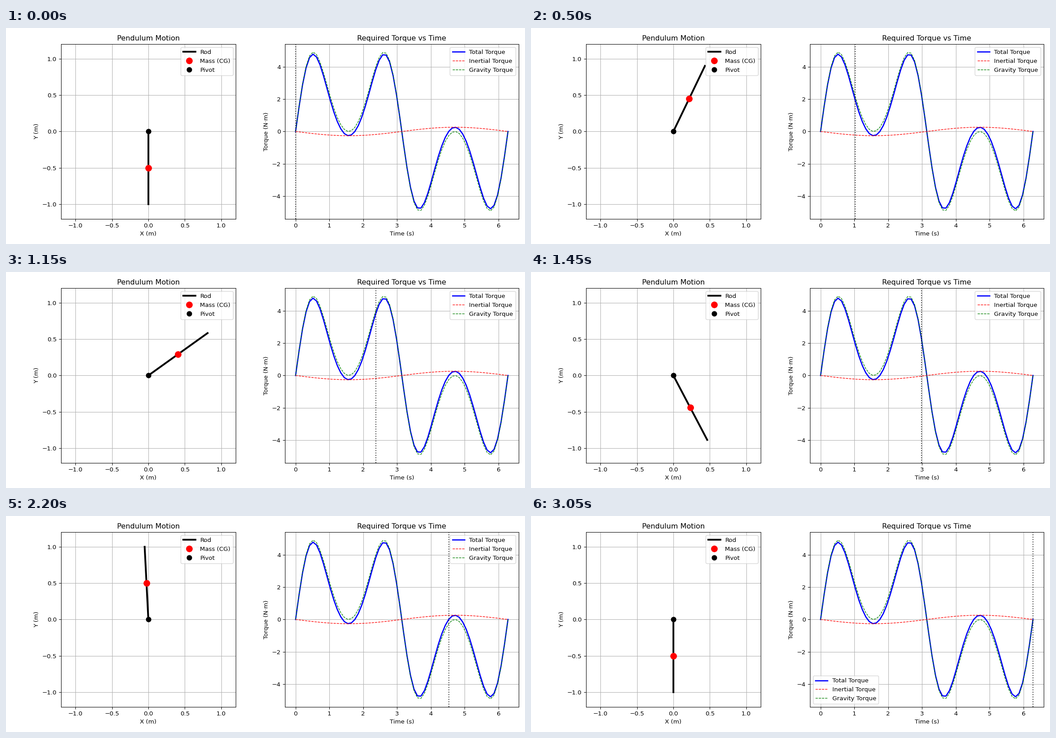
These frames come from a looping animation (1159 by 483 pixels, 3.1 s). A matplotlib script:

```python
import numpy as np
import matplotlib.pyplot as plt
from matplotlib.animation import FuncAnimation

FRAMES, INTERVAL = 62, 50
STAGE_DPI, LAYOUT_DPI = 96.6, 100
MASS, LENGTH, GRAVITY = 1.0, 1.0, 9.81
CENTRE = LENGTH / 2
INERTIA = MASS * LENGTH**2 / 12

plt.rcParams["font.family"] = "DejaVu Sans"

time = np.linspace(0, 2 * np.pi, FRAMES)
theta = np.pi * np.sin(time)
inertial = -INERTIA * np.pi * np.sin(time)
gravity = MASS * GRAVITY * CENTRE * np.sin(theta)


def label_axes(ax, title, xlabel, ylabel):
    ax.set_title(title)
    ax.set_xlabel(xlabel)
    ax.set_ylabel(ylabel)
    ax.grid(True)


fig, (swing, chart) = plt.subplots(1, 2, figsize=(12, 5), dpi=STAGE_DPI)

swing.set_xlim(-1.2, 1.2)
swing.set_ylim(-1.2, 1.2)
swing.set_aspect("equal")
label_axes(swing, "Pendulum Motion", "X (m)", "Y (m)")
rod, = swing.plot([0, 0], [0, -LENGTH], "k-", lw=3, label="Rod")
mass, = swing.plot([0], [-CENTRE], "ro", markersize=10, label="Mass (CG)")
swing.plot([0], [0], "ko", markersize=8, label="Pivot")

label_axes(chart, "Required Torque vs Time", "Time (s)", "Torque (N·m)")
chart.plot(time, inertial + gravity, "b-", lw=2, label="Total Torque")
chart.plot(time, inertial, "r--", lw=1, label="Inertial Torque")
chart.plot(time, gravity, "g--", lw=1, label="Gravity Torque")
cursor = chart.axvline(0, color="k", ls=":", lw=1.5, alpha=0.75)

# Both legends move to the emptiest corner on every draw.
swing.legend(loc="best")
chart.legend(loc="best")

# Margins come from text measured at the layout resolution.
fig.set_dpi(LAYOUT_DPI)
fig.tight_layout()
fig.set_dpi(STAGE_DPI)


def update(frame):
    x, y = np.sin(theta[frame]), -np.cos(theta[frame])
    rod.set_data([0, LENGTH * x], [0, LENGTH * y])
    mass.set_data([CENTRE * x], [CENTRE * y])
    cursor.set_xdata([time[frame]] * 2)
    return rod, mass, cursor


animation = FuncAnimation(fig, update, frames=FRAMES, interval=INTERVAL,
                          repeat=True, repeat_delay=0, blit=False)
plt.show()
```
